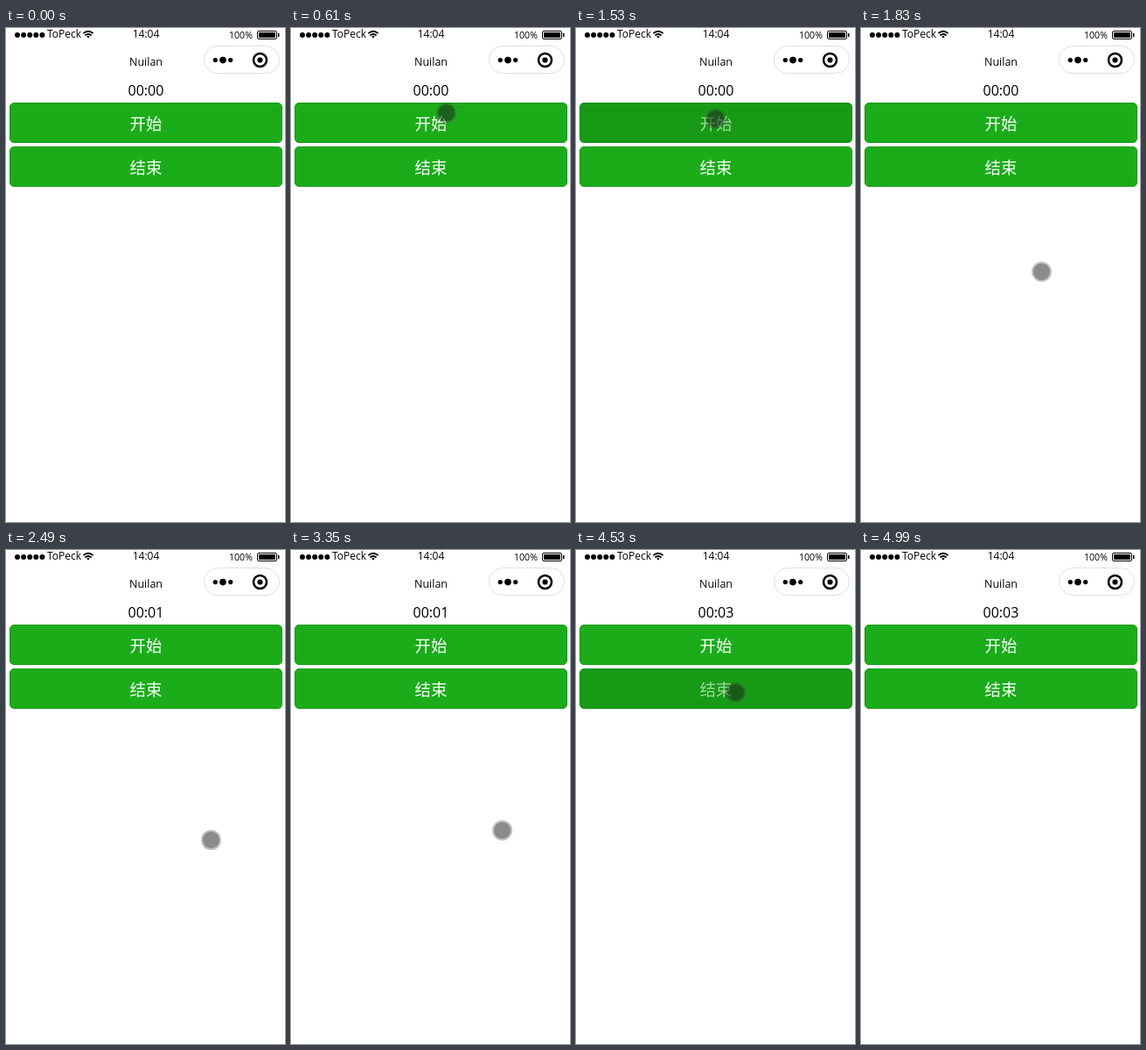
Recreate the animation shown at these times as an HTML page. Size 319 px wide and 563 px high, loop 6050 ms.

```html
<!DOCTYPE html>
<html lang="zh">
<head>
<meta charset="utf-8">
<title>Timer</title>
<style>
  html, body { margin: 0; width: 100%; height: 100%; overflow: hidden; background: #fff; }
  svg { display: block; width: 100%; height: 100%; }
  text { font-family: "Open Sans", "Noto Sans", sans-serif; }
  .mid { text-anchor: middle; }
  .button rect { fill: #1aad19; stroke: #179a16; }
  .button text { font: 18.4px "Noto Sans CJK SC", "Noto Sans CJK", sans-serif; fill: #fff; text-anchor: middle; }
  .button.pressed rect { fill: #179b16; stroke: #148a13; }
  .button.pressed text { fill-opacity: .6; }
  #pointer .halo { fill: rgba(60, 60, 60, .33); }
  #pointer .core { fill: rgba(0, 0, 0, .27); }
  #pointer.down .halo { fill: rgba(200, 185, 10, .6); }
  #pointer.down .core { fill: rgba(205, 165, 10, .6); }
</style>
</head>
<body>
<svg viewBox="0 0 319 563">
  <!-- status bar -->
  <path d="M13 8h28.5" stroke="#000" stroke-width="6" stroke-linecap="round" stroke-dasharray="0 7.1"/>
  <text x="47" y="11" font-size="12">ToPeck</text>
  <g fill="none" stroke="#000" stroke-width="1.8">
    <path d="M88.4 6.2q5.6-5 11.2 0M90.4 8.5q3.6-3 7.2 0"/>
    <path d="M92.2 9.6q1.8-1.2 3.6 0L94 11.8z" fill="#000" stroke="none"/>
  </g>
  <text class="mid" x="160" y="11" font-size="12">14:04</text>
  <text x="255" y="12" font-size="10.6">100%</text>
  <rect x="287.5" y="3.5" width="22" height="9" rx="1.5" fill="none" stroke="#000"/>
  <path d="M289 5h19v6h-19zM311 6h1.5v4H311z"/>

  <!-- navigation bar -->
  <text class="mid" x="160" y="43" font-size="12.5">Nuilan</text>
  <rect x="226.5" y="20.5" width="86" height="31" rx="15.5" fill="#fff" stroke="#dcdfe3"/>
  <circle cx="239.3" cy="36.6" r="2.6"/>
  <circle cx="248" cy="36.6" r="3.8"/>
  <circle cx="256.7" cy="36.6" r="2.6"/>
  <circle cx="290.5" cy="36.5" r="7.5" fill="none" stroke="#000" stroke-width="2.5"/>
  <circle cx="290.5" cy="36.5" r="3.1"/>

  <text id="clock" class="mid" x="160" y="77" font-size="16">00:00</text>
  <g class="button" id="start">
    <rect x="4.5" y="85.5" width="311" height="45" rx="4.5"/>
    <text x="160" y="115.5">开始</text>
  </g>
  <g class="button" id="stop">
    <rect x="4.5" y="135.5" width="311" height="45" rx="4.5"/>
    <text x="160" y="165.5">结束</text>
  </g>
  <g id="pointer">
    <circle class="halo" r="11.5"/>
    <circle class="core" r="9.5"/>
  </g>
</svg>
<script>
const LOOP = 6050, STEP = 50;
const [clock, start, stop, pointer] =
  ["clock", "start", "stop", "pointer"].map(id => document.getElementById(id));

// Key places the pointer travels between
const startEdge = { x: 170.5, y: 86.5 }, onStart = { x: 159.5, y: 103.5 };
const onStop = { x: 182.5, y: 162.5 }, below = { x: 231, y: 250 };

// A glide bends towards `via`, slows down by the power `ease`, then rests until the next one or `hide`.
const GLIDES = [
  { at: 420, lasts: 240, from: { x: 250.5, y: 301.5 }, via: { x: 228, y: 165 }, to: startEdge, ease: 3 },
  { at: 810, lasts: 100, from: startEdge, to: onStart },
  { at: 1580, lasts: 350, from: onStart, via: { x: 179, y: 208 }, to: { x: 219, y: 311.5 }, ease: 1.45, hide: 1980 },
  { at: 2050, lasts: 100, from: { x: 229.5, y: 323.5 }, to: { x: 234.5, y: 330.5 } },
  { at: 3350, lasts: 70, from: { x: 241.5, y: 319.5 }, to: { x: 301.5, y: 283 }, hide: 3470 },
  { at: 3980, lasts: 250, from: { x: 313, y: 239.5 }, via: { x: 237, y: 207 }, to: onStop, ease: 2 },
  { at: 4630, lasts: 150, from: onStop, to: below },
  { at: 4780, lasts: 150, from: below, to: { x: 293, y: 510.5 }, ease: 3, hide: 4990 },
];
const CLICKS = [
  { button: start, down: 1380, up: 1530 },
  { button: stop, down: 4430, up: 4530 },
];
const TIMER = { from: 1483, second: 993, to: 4530 };

const clamp = (value, low, high) => Math.min(high, Math.max(low, value));
const within = (t, from, to) => t >= from && t < to;
const mix = (a, b, k) => ({ x: a.x + (b.x - a.x) * k, y: a.y + (b.y - a.y) * k });

function pointerAt(t) {
  const glide = GLIDES.findLast(g => g.at <= t);
  if (!glide || t >= glide.hide) return null;
  const { at, lasts, from, to, via = mix(from, to, .5), ease = 1 } = glide;
  const steps = Math.round(lasts / STEP);
  const progress = Math.floor(clamp((t - at) / lasts, 0, 1) * steps) / steps;
  const k = 1 - (1 - progress) ** ease;
  return mix(mix(from, via, k), mix(via, to, k), k);
}

function draw(t) {
  const seconds = Math.floor((clamp(t, TIMER.from, TIMER.to) - TIMER.from) / TIMER.second);
  clock.textContent = "00:" + String(seconds).padStart(2, "0");

  for (const { button, up } of CLICKS)
    button.classList.toggle("pressed", within(t, up - 50, up + 100));
  pointer.classList.toggle("down", CLICKS.some(({ down, up }) => within(t, down, up)));

  const place = pointerAt(t);
  pointer.style.display = place ? "" : "none";
  if (place) pointer.setAttribute("transform", `translate(${place.x} ${place.y})`);
}

const origin = performance.now();
function frame() {
  draw((performance.now() - origin) % LOOP);
  requestAnimationFrame(frame);
}
frame();
</script>
</body>
</html>
```
